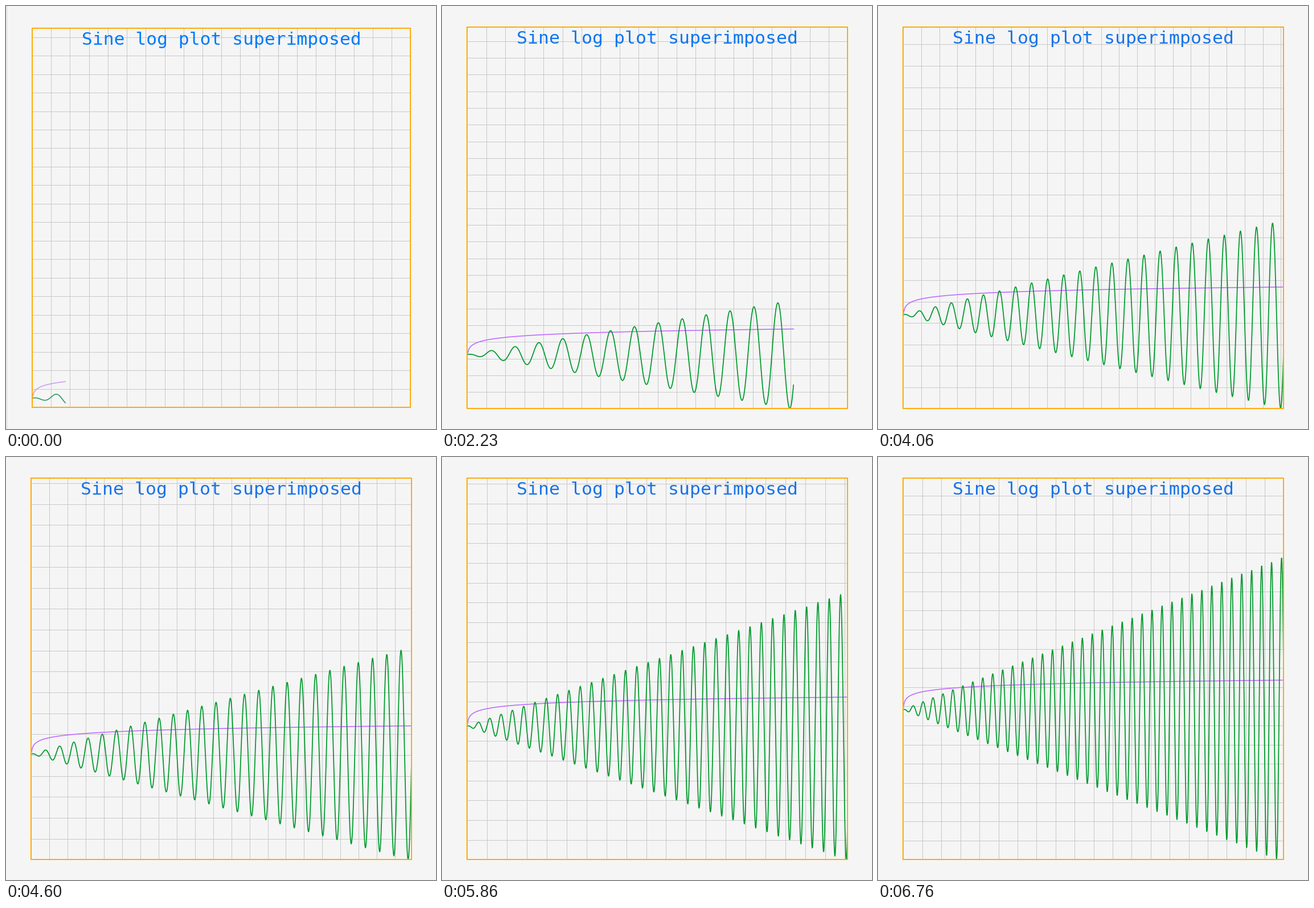
A matplotlib script that plays this animation: 755x742 px, repeating every 8.3 s.

```python
import numpy as np
import matplotlib.pyplot as plt
from matplotlib.animation import FuncAnimation
from matplotlib.collections import LineCollection
from matplotlib.lines import Line2D
from matplotlib.patches import Rectangle
from matplotlib.transforms import Affine2D, Bbox

W, H, DPI = 755, 742, 100
PX = 72 / DPI
LOOP, TICK = 8300, 20

# Bursts of redraws: first time, last time, number of steps
BURSTS = [(80, 900, 13), (970, 1740, 12), (1810, 2580, 12), (2650, 3420, 12),
          (3490, 4270, 12), (4330, 5160, 13), (5230, 6000, 12), (6070, 6760, 11)]
CHANGES = np.concatenate([np.round(np.linspace(a, b, n), -1) for a, b, n in BURSTS])
LAST = len(CHANGES)

# Points plotted after a given redraw; about 12 are added each time
KEY_STEP = [0, 32, 48, 58, 73, 84, 96, 97]
KEY_COUNT = [44, 429, 621, 744, 924, 1056, 1199, 1200]

X_SPAN, Y_SPAN, Y_LOW = 500, 3000, 70
IDX = np.arange(1201)
WAVE = IDX * np.cos(IDX / 5)
LOG = 15 + 30.75 * np.log(np.maximum(IDX, 1))
DEPTH = np.maximum(Y_LOW, -np.minimum.accumulate(WAVE))

BG = "#f5f5f5"
GRID = "#c8c8c8"
ORANGE = "#ffaa0c"
GREEN, GREEN_SOFT = "#009a2c", "#3a9f6c"
PURPLE, PURPLE_SOFT = "#bf69ff", "#c99bf0"
BLUE_A, BLUE_B = np.array([0, 122, 250]) / 255, np.array([26, 115, 232]) / 255

fig = plt.figure(figsize=(W / DPI, H / DPI), dpi=DPI, facecolor=BG)
pix = Affine2D().scale(1, -1).translate(0, H) + fig.dpi_scale_trans.frozen().inverted() \
    + fig.dpi_scale_trans


def add(artist, z):
    artist.set_zorder(z)
    artist.set_transform(pix)
    fig.add_artist(artist)
    return artist


edge = add(Line2D([0.5, 0.5], [0, H], color="#d2d2d2", lw=PX), 0)
grid = add(LineCollection([], colors=GRID, linewidths=PX), 1)
log_line = add(Line2D([], [], lw=1.6 * PX), 2)
wave_line = add(Line2D([], [], lw=1.75 * PX), 3)
frame = add(Rectangle((0, 0), 1, 1, fill=False, ec=ORANGE, lw=2 * PX,
                      joinstyle="round"), 4)
title = fig.text(0.5, 0.5, "Sine log plot superimposed", family="DejaVu Sans Mono",
                 ha="center", va="baseline", zorder=5)


def grid_lines(left, top, right, bottom, dx, dy):
    xs = np.floor(np.arange(left + dx, right - 1, dx)) + 0.5
    ys = np.floor(np.arange(bottom - dy, top + 1, -dy)) + 0.5
    return ([[(x, top), (x, bottom)] for x in xs]
            + [[(left, y), (right, y)] for y in ys])


def draw(i):
    step = int(np.sum(CHANGES <= i * TICK + 10))
    first = step == 0
    n = int(round(np.interp(step, KEY_STEP, KEY_COUNT)))
    left, top, right, bottom = (45.5, 39, 710, 703.5) if first else (44, 37, 712, 706)
    w, h = right - left, bottom - top

    span = max(X_SPAN, n)
    grid_span = span if step == LAST else max(X_SPAN, n - 3)
    fives = int(round(grid_span / 100))
    depth = DEPTH[n]
    dx = w * 5 * fives / grid_span
    dy = h * 30 * min(fives, 7) / (Y_SPAN + depth)
    grid.set_segments(grid_lines(left, top, right, bottom, dx, dy))

    x = left + IDX[:n + 1] * w / span
    scale = h / Y_SPAN
    base = bottom - depth * scale
    wave_line.set_data(x, base - WAVE[:n + 1] * scale)
    log_line.set_data(x[1:], base - LOG[1:n + 1] * scale)
    wave_line.set_color(GREEN_SOFT if first else GREEN)
    log_line.set_color(PURPLE_SOFT if first else PURPLE)
    clip = Bbox.from_extents(left, H - bottom, right, H - top)
    for line in (wave_line, log_line):
        line.set_clip_box(clip)

    frame.set_bounds(left, top, w, h)
    edge.set_visible(first)
    title.set_position((378.3 / W, 1 - (68 if first else 66) / H))
    title.set_fontsize((31.3 if first else 31.5) * PX)
    title.set_color(BLUE_A + (BLUE_B - BLUE_A) * min(1, step / 60))
    return grid, log_line, wave_line, frame, edge, title


anim = FuncAnimation(fig, draw, frames=LOOP // TICK, interval=TICK,
                     init_func=lambda: draw(0), repeat=True, repeat_delay=0, blit=False)
plt.show()
```
